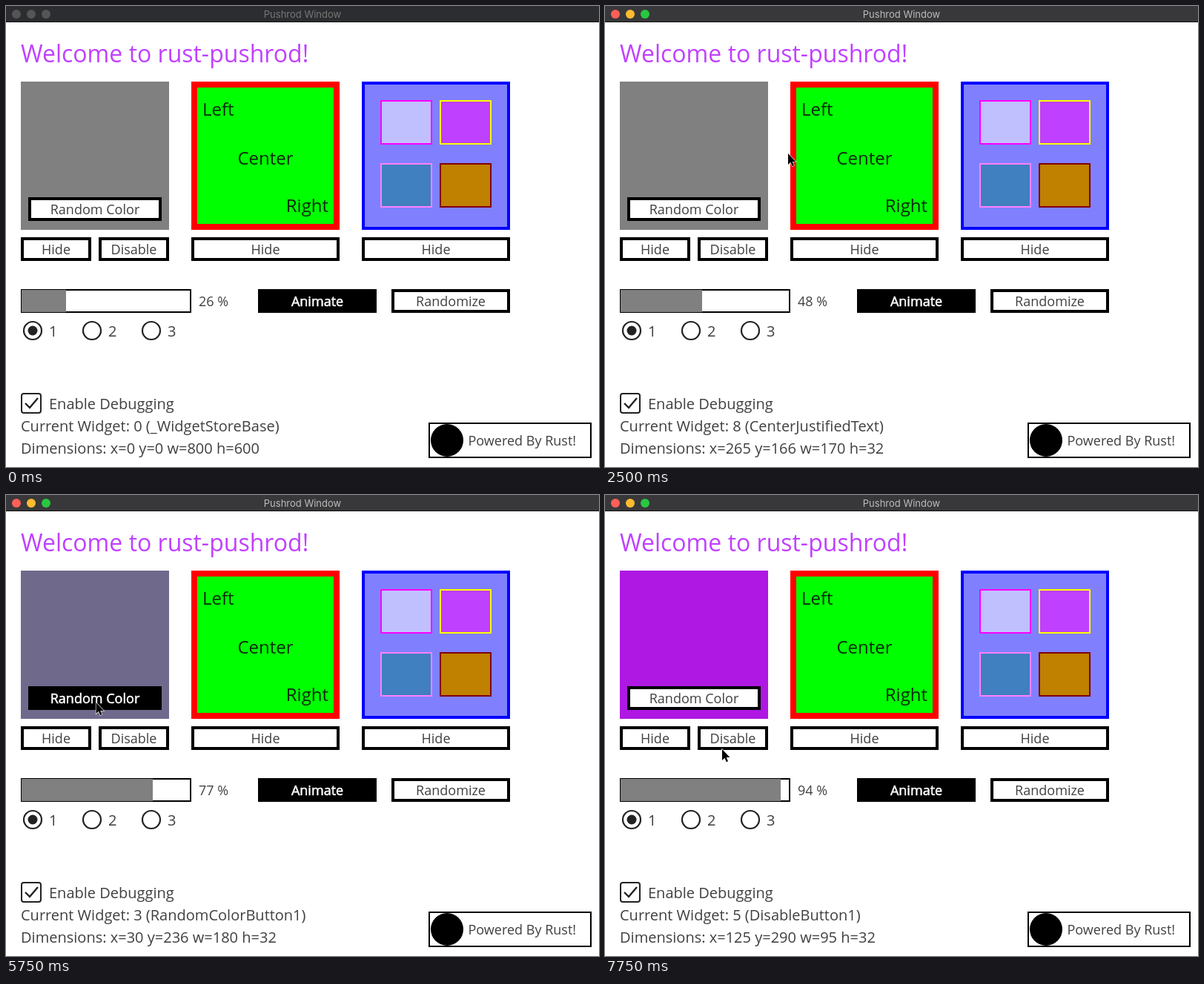
Recreate the animation shown at these times as an HTML page. Size 800 by 622 pixels, loop 8 s.

```html
<!DOCTYPE html>
<html lang="en">
<head>
<meta charset="utf-8">
<title>Pushrod Window</title>
<style>
  html, body { margin: 0; width: 100%; height: 100%; overflow: hidden; background: #fff; }
  svg { display: block; width: 800px; height: 622px; font: 18px "Open Sans", sans-serif; fill: #404040; }
  .title { font: 13px Inter, sans-serif; }
  .big { font-size: 32px; }
  .mid { font-size: 24px; fill: #0a280a; }
  .info { font-size: 20px; }
  .center { text-anchor: middle; }
  .end { text-anchor: end; }
  .inverse { fill: #fff; stroke: #fff; stroke-width: .55px; }
</style>
</head>
<body>
<svg id="stage" viewBox="0 0 800 622"></svg>
<script>
const STEP = 250, LOOP = 8000;
const stage = document.getElementById('stage');

function add(tag, attrs, content = '') {
  const node = document.createElementNS('http://www.w3.org/2000/svg', tag);
  set(node, attrs);
  node.textContent = content;
  return stage.appendChild(node);
}
function set(node, attrs) {
  for (const key in attrs) node.setAttribute(key, attrs[key]);
}
// Rectangle whose border lies inside its bounds
function box(x, y, width, height, fill, border = 0, stroke = '#000') {
  return add('rect', {
    x: x + border / 2, y: y + border / 2, width: width - border, height: height - border,
    fill, stroke: border ? stroke : 'none', 'stroke-width': border
  });
}
const circle = (cx, cy, r, fill, stroke = 'none') =>
  add('circle', { cx, cy, r, fill, stroke, 'stroke-width': 2.2 });
const text = (content, x, y, cls = '', attrs = {}) =>
  add('text', { x, y, class: cls, ...attrs }, content);

function button(label, x, y, width) {
  const frame = box(x, y, width, 32, '#fff', 4);
  const caption = text(label, x + width / 2, y + 23, 'center');
  return pressed => {
    set(frame, { fill: pressed ? '#000' : '#fff' });
    set(caption, { class: pressed ? 'center inverse' : 'center' });
  };
}

// Window chrome
const titleBar = box(0, 0, 800, 22, '#2b2d30');
box(0, 21, 800, 1, '#111');
const lights = [14, 34, 54].map(x => circle(x, 11, 6, '#555'));
const title = text('Pushrod Window', 400, 16, 'title center');

text('Welcome to rust-pushrod!', 20, 76, 'big', { fill: '#c040ff' });

// Panels
const swatch = box(20, 102, 200, 200, '#808080');
const pressRandom = button('Random Color', 30, 258, 180);
box(250, 102, 200, 200, '#0f0', 8, '#f00');
text('Left', 265, 148, 'mid');
text('Center', 350, 214, 'mid center');
text('Right', 435, 278, 'mid end');
box(480, 102, 200, 200, '#8080ff', 4, '#00f');
box(505, 127, 70, 60, '#c0c0ff', 2, '#f0f');
box(585, 127, 70, 60, '#c040ff', 2, '#ff0');
box(505, 212, 70, 60, '#4080c0', 2, '#ff80ff');
box(585, 212, 70, 60, '#c08000', 2, '#800000');

button('Hide', 20, 312, 95);
button('Disable', 125, 312, 95);
button('Hide', 250, 312, 200);
button('Hide', 480, 312, 200);

// Progress row
box(20, 382, 230, 32, '#fff', 2);
const bar = box(21, 383, 0, 30, '#808080');
const percentLabel = text('', 260, 405);
button('Animate', 340, 382, 160)(true);
button('Randomize', 520, 382, 160);

// Radio buttons and checkbox
[1, 2, 3].forEach((n, i) => {
  circle(36 + 80 * i, 438, 12, '#fff', '#222');
  text(n, 58 + 80 * i, 446, 'info');
});
circle(36, 438, 6.5, '#222');
add('rect', { x: 21, y: 523, width: 26, height: 26, rx: 3, fill: '#fff', stroke: '#222', 'stroke-width': 2 });
add('path', { d: 'M26 536l6 6 11-13', fill: 'none', stroke: '#222', 'stroke-width': 2.4 });
text('Enable Debugging', 58, 544, 'info');
const widgetLabel = text('', 20, 574, 'info');
const sizeLabel = text('', 20, 604, 'info');

box(570, 562, 220, 48, '#fff', 2);
circle(595, 586, 22, '#000');
text('Powered By Rust!', 623.5, 593);

const cursor = add('path', {
  d: 'M0 0V15L3.4 11.8 5.8 17.2 8 16.2 5.7 11H10.4Z',
  fill: '#000', stroke: '#fff', 'stroke-width': 1.2, 'paint-order': 'stroke'
});

// Timelines: [start in ms, value]
const colors = [[0, '#808080'], [4000, '#a89c2d'], [5000, '#6f6a8c'], [6000, '#7713e6'], [7000, '#ae18e2']];
const widgets = [
  [0, ['0 (_WidgetStoreBase)', 'x=0 y=0 w=800 h=600']],
  [2250, ['8 (CenterJustifiedText)', 'x=265 y=166 w=170 h=32']],
  [3000, ['3 (RandomColorButton1)', 'x=30 y=236 w=180 h=32']],
  [7750, ['5 (DisableButton1)', 'x=125 y=290 w=95 h=32']]
];
const pointer = [
  [750, [743, 296]], [1000, [724, 301]], [1250, [700, 281]], [1500, [650, 255]], [1750, [560, 225]],
  [2000, [450, 206]], [2250, [330, 199]], [2500, [247, 199]], [2750, [200, 225]],
  [3000, [150, 263]], [3250, [121.5, 280]], [7750, [158, 343]]
];
const valueAt = (timeline, t) => timeline.filter(([start]) => start <= t).pop()?.[1];

function draw(t) {
  const focused = t >= 1500;
  set(titleBar, { fill: focused ? '#38383a' : '#2b2d30' });
  set(title, { fill: focused ? '#bdbdbd' : '#777' });
  lights.forEach((light, i) =>
    set(light, { fill: focused ? ['#ff5f57', '#febc2e', '#28c840'][i] : '#555' }));

  const percent = Math.round(26.1 + 8.77 * t / 1000);
  set(bar, { width: Math.floor(2.3 * percent + .5) });
  percentLabel.textContent = percent + ' %';

  set(swatch, { fill: valueAt(colors, t) });
  pressRandom(t >= 3750 && t < 7000 && t % 1000 === 750);

  const [name, size] = valueAt(widgets, t);
  widgetLabel.textContent = 'Current Widget: ' + name;
  sizeLabel.textContent = 'Dimensions: ' + size;

  const spot = valueAt(pointer, t);
  set(cursor, spot
    ? { transform: `translate(${spot})`, visibility: 'visible' }
    : { visibility: 'hidden' });
}

const begin = performance.now();
function tick() {
  const t = (performance.now() - begin) % LOOP;
  draw(Math.floor(t / STEP) * STEP);
  requestAnimationFrame(tick);
}
tick();
</script>
</body>
</html>
```
